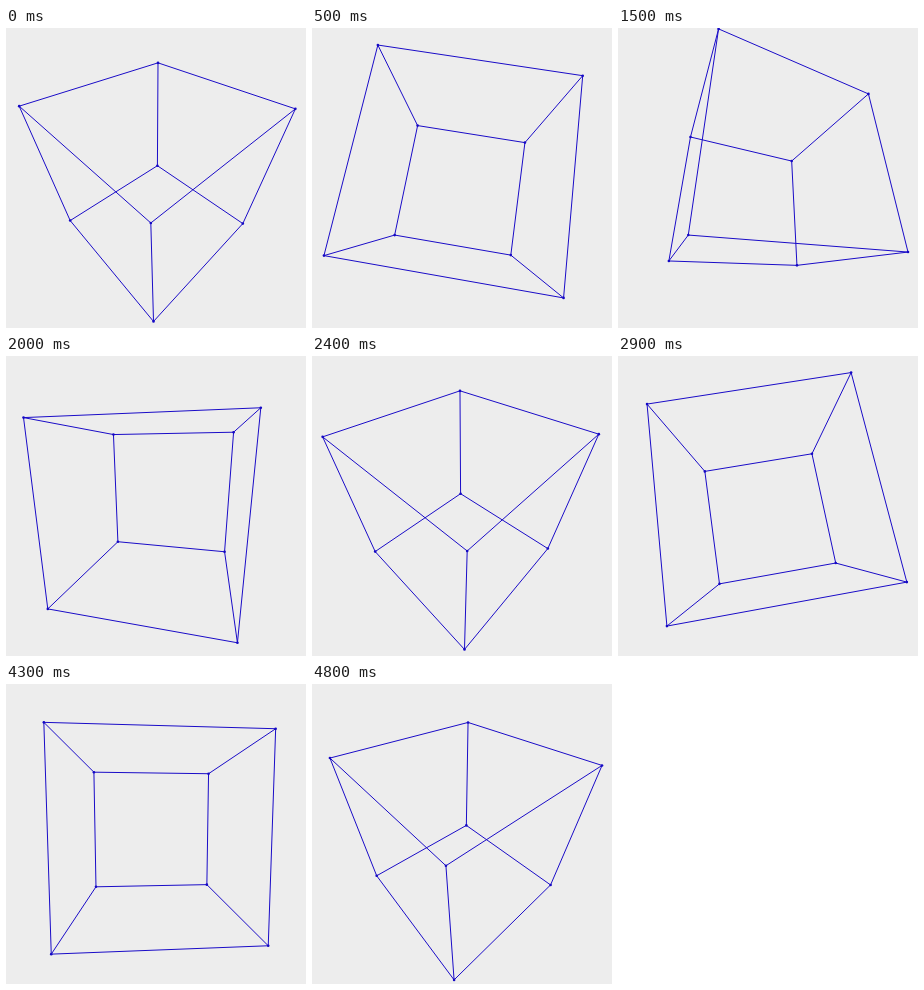
Animation, 300 px wide and 300 px high, one loop 4.9 s. Source, as an HTML page with a canvas:

```html
<!DOCTYPE html>
<html lang="en">
<head>
<meta charset="utf-8">
<title>Rotating wire cube</title>
<style>
  html, body { margin: 0; width: 100%; height: 100%; overflow: hidden; background: #ededed; }
  canvas { display: block; width: 300px; height: 300px; }
</style>
</head>
<body>
<canvas id="stage" width="300" height="300"></canvas>
<script>
const ctx = document.getElementById('stage').getContext('2d');
const LOOP = 4900, STEP = 100;
const CENTER = 150, SCALE = 225.4, DISTANCE = 3;
const PAPER = '#ededed', LINE = '#1a0cc8', DOT = '#1408c4';

// [step, angle in degrees]: the spin is slightly uneven
const KEYS = [
  [0, 43.8], [10, 117.3], [12, 131], [15, 155.1], [24, 223.8],
  [35, 303.9], [36, 313], [43, 363.8], [48, 401.3]
];

function angleAt(step) {
  let i = 1;
  while (i < KEYS.length - 1 && KEYS[i][0] < step) i++;
  const [s0, a0] = KEYS[i - 1], [s1, a1] = KEYS[i];
  return (a0 + (a1 - a0) * (step - s0) / (s1 - s0)) * Math.PI / 180;
}

// Turn about y by a, then about x by -a, then apply perspective
function project(x, y, z, a) {
  const s = Math.sin(a), c = Math.cos(a);
  const px = c * x + s * z;
  const depth = c * z - s * x;
  const py = c * y + s * depth;
  const pz = c * depth - s * y;
  const k = SCALE / (DISTANCE - pz);
  return [CENTER + px * k, CENTER + py * k];
}

function line(from, to) {
  ctx.beginPath();
  ctx.moveTo(...from);
  ctx.lineTo(...to);
  ctx.stroke();
}

function dot([x, y]) {
  ctx.beginPath();
  ctx.arc(x, y, 1.3, 0, Math.PI * 2);
  ctx.fill();
}

function draw(step) {
  const a = angleAt(step);
  const points = [];
  for (let i = 0; i < 8; i++) {
    points.push(project(i & 1 ? 1 : -1, i & 2 ? 1 : -1, i & 4 ? 1 : -1, a));
  }
  ctx.fillStyle = PAPER;
  ctx.fillRect(0, 0, 300, 300);
  ctx.strokeStyle = LINE;
  ctx.lineWidth = 1;
  for (let i = 0; i < 8; i++) {
    for (const bit of [1, 2, 4]) {
      if (!(i & bit)) line(points[i], points[i | bit]);
    }
  }
  ctx.fillStyle = DOT;
  points.forEach(dot);
}

const start = performance.now();
function tick() {
  const t = (performance.now() - start) % LOOP;
  draw(Math.floor(t / STEP));
  requestAnimationFrame(tick);
}
tick();
</script>
</body>
</html>
```
